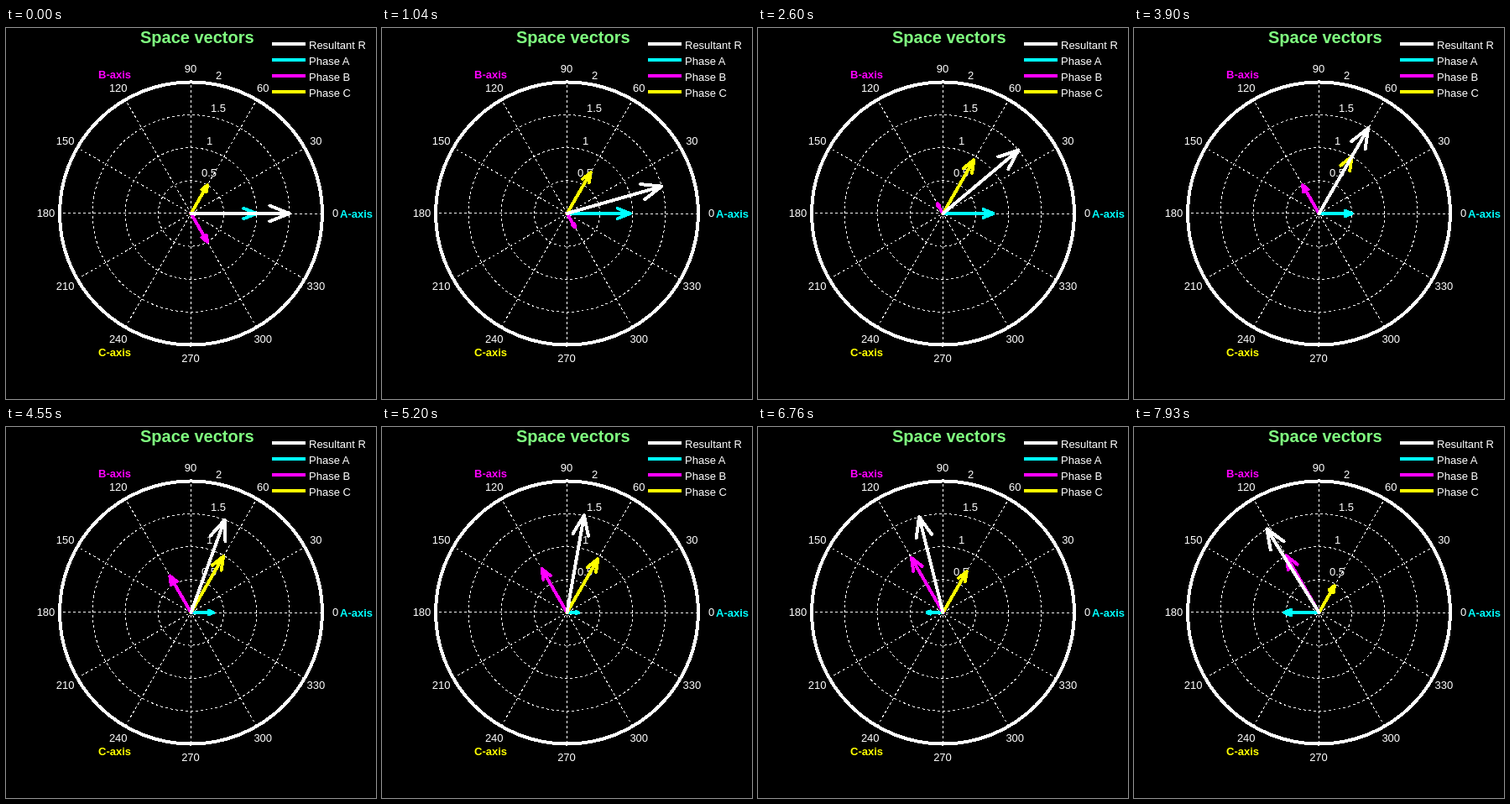
Write an HTML page that moves like this. It is 441 px wide and 442 px high and loops after 8 s.

```html
<!DOCTYPE html>
<html lang="en">
<head>
<meta charset="utf-8">
<title>Space vectors</title>
<style>
html, body { margin: 0; width: 100%; height: 100%; overflow: hidden; background: #000; }
svg { display: block; }
path { fill: none; stroke: #fff; stroke-width: 4; shape-rendering: crispEdges; }
.grid { stroke-width: 1; stroke-dasharray: 3 3; }
.vector { stroke-linecap: round; stroke-linejoin: round; }
text { fill: #fff; font: 13px "Liberation Sans", Arial, sans-serif; }
.axis { font-weight: bold; }
.title { font-weight: bold; font-size: 20px; }
.centre { text-anchor: middle; }
</style>
</head>
<body>
<svg id="stage" width="441" height="442" viewBox="0 0 441 442"></svg>
<script>
const stage = document.getElementById('stage');
const CX = 220.5, CY = 221, RADIUS = 156.5, UNIT = RADIUS / 2;
const LOOP = 8000, STEP = 130, STEP_DEG = 2;
const WHITE = '#fff', CYAN = '#0ff', MAGENTA = '#f0f', YELLOW = '#ff0';
const rad = deg => deg * Math.PI / 180;

function add(tag, attrs) {
  const el = document.createElementNS('http://www.w3.org/2000/svg', tag);
  for (const name in attrs) el.setAttribute(name, attrs[name]);
  return stage.appendChild(el);
}

function path(d, cls, color = WHITE) {
  return add('path', { d, class: cls, style: `stroke:${color}` });
}

function text(str, x, y, cls = '', color = WHITE) {
  add('text', { x, y, class: cls, style: `fill:${color}` }).textContent = str;
}

const polyline = points => 'M' + points.map(p => p.join(' ')).join('L');

function ring(r, cls) {
  path(`M${CX + r} ${CY}A${r} ${r} 0 1 0 ${CX - r} ${CY}A${r} ${r} 0 1 0 ${CX + r} ${CY}`, cls);
}

function buildGrid() {
  for (let i = 1; i < 4; i++) ring(i * UNIT / 2, 'grid');
  for (let deg = 30; deg <= 180; deg += 30) {
    // A tiny lean settles which pixel row the level spoke falls on.
    const angle = rad(deg - 0.05);
    const dx = RADIUS * Math.cos(angle), dy = RADIUS * Math.sin(angle);
    path(polyline([[CX - dx, CY + dy], [CX + dx, CY - dy]]), 'grid');
  }
  ring(RADIUS, 'rim');

  for (let deg = 0; deg < 360; deg += 30) {
    const x = CX + 172.5 * Math.cos(rad(deg));
    const y = CY - 172.5 * Math.sin(rad(deg));
    text(deg, x - 0.5, Math.round(y + 4.4), 'centre');
  }
  for (let v = 0.5; v <= 2; v += 0.5) {
    const r = (v + 0.025) * UNIT;
    text(v, Math.round(CX + 7.2 + r * Math.cos(rad(82))), Math.round(CY - 3 - r * Math.sin(rad(82))));
  }
}

function buildLabels() {
  text('Space vectors', 160, 18, 'title', '#80ff80');
  text('A-axis', 398, 226, 'axis', CYAN);
  text('B-axis', 110, 60, 'axis', MAGENTA);
  text('C-axis', 110, 391, 'axis', YELLOW);
  const legend = [['Resultant R', WHITE], ['Phase A', CYAN], ['Phase B', MAGENTA], ['Phase C', YELLOW]];
  legend.forEach(([name, color], i) => {
    const y = 19 + 19 * i;
    path(`M317 ${y}H357`, 'key', color);
    text(name, 361, y + 6);
  });
}

// The head scales with the vector's length; negative lengths point backwards.
function arrow(length, deg) {
  const c = length * UNIT * Math.cos(rad(deg)), s = length * UNIT * Math.sin(rad(deg));
  const shape = [[0, 0], [1, 0], [0.8, 0.08], [1, 0], [0.8, -0.08]];
  return polyline(shape.map(([u, v]) => [CX + u * c - v * s, CY - u * s - v * c]));
}

buildGrid();
buildLabels();
const phases = [CYAN, MAGENTA, YELLOW].map(color => path('', 'vector', color));
const resultant = path('', 'vector');

function draw(time) {
  const theta = Math.floor((time % LOOP) / STEP) * STEP_DEG;
  phases.forEach((phase, i) => {
    const axis = 120 * i;
    phase.setAttribute('d', arrow(Math.cos(rad(theta - axis)), axis));
  });
  resultant.setAttribute('d', arrow(1.5, theta));
}

let start;
function tick(now) {
  start ??= now;
  draw(now - start);
  requestAnimationFrame(tick);
}
draw(0);
requestAnimationFrame(tick);
</script>
</body>
</html>
```
